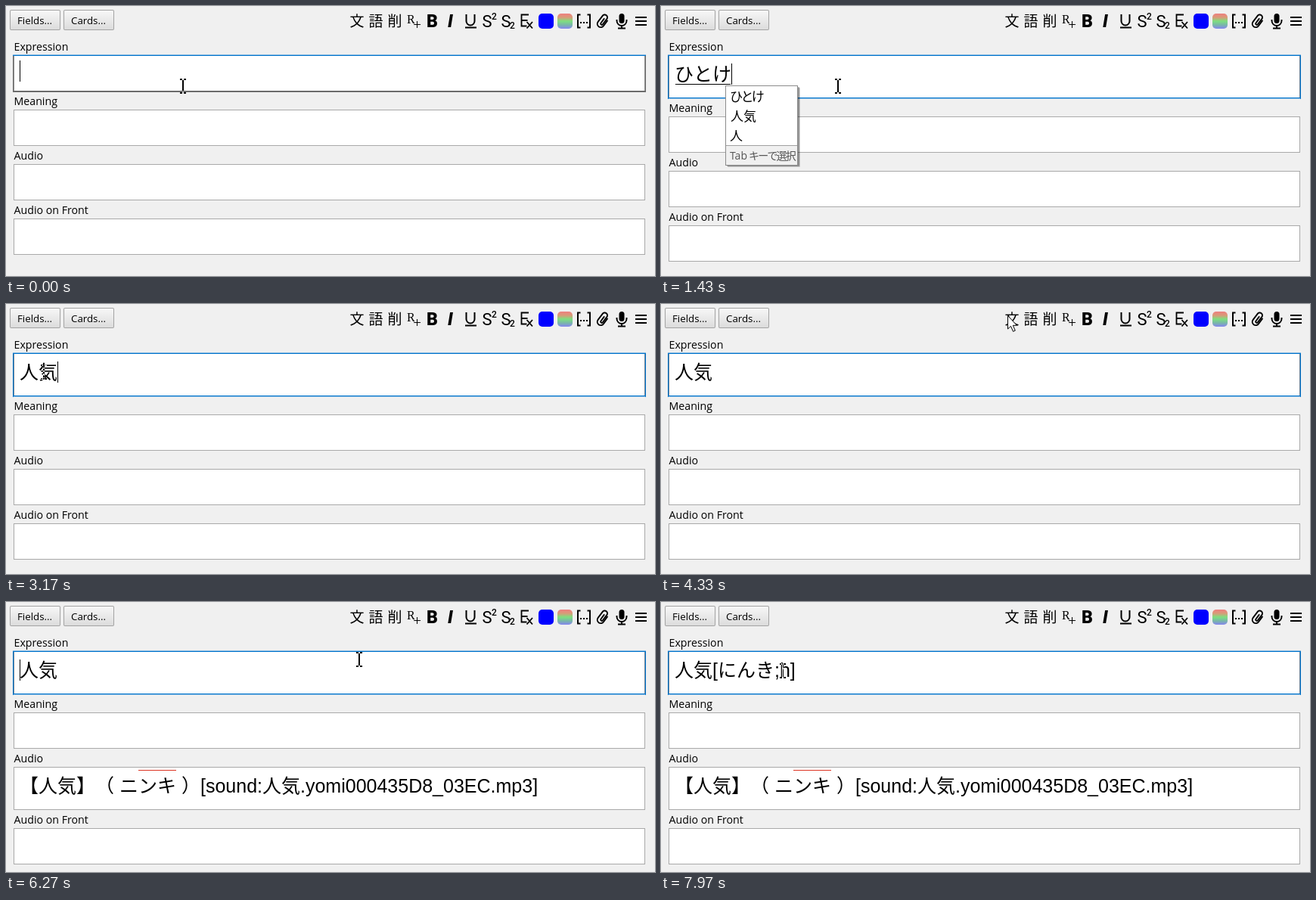
These frames come from a looping animation (858x357 px, 8 s). An HTML page with a canvas:

```html
<!DOCTYPE html>
<html lang="ja">
<head>
<meta charset="utf-8">
<style>
  html, body { margin: 0; width: 858px; height: 357px; overflow: hidden; background: #f0f0f0; }
  canvas { display: block; }
</style>
</head>
<body>
<canvas id="stage" width="858" height="357"></canvas>
<script>
const LOOP = 8000;
const ctx = document.getElementById('stage').getContext('2d');
const CJK = '"Noto Sans CJK JP", "Noto Sans CJK", sans-serif';
const UI = '"Open Sans", "Noto Sans", ' + CJK;
const FIELD = '300 25px "Liberation Sans", ' + CJK;
const BLUE = '#0074cc';

// Field content by start time; preedit entries are underlined
const typed = [
  [0, ''], [870, 'ｈ', 1], [930, 'ひ', 1], [1070, 'ひｔ', 1], [1170, 'ひと', 1],
  [1330, 'ひとｋ', 1], [1430, 'ひとけ', 1], [1630, '人気', 2], [1870, '人気'],
  [7400, '人気[にんき;h]']
];

// Caret: from, to, x
const carets = [
  [0, 30, 18], [530, 870, 18], [870, 1070, 43], [1070, 1330, 68], [1330, 1630, 93],
  [1870, 2400, 68], [2930, 3470, 68], [3530, 4060, 18], [4590, 5600, 18],
  [6110, 6640, 18], [7170, 7400, 18], [7400, 7930, 178]
];

const hold = () => 0;
const linear = p => p;
const easeOut = p => 1 - (1 - p) ** 2;
const easeInOut = p => p * p * (3 - 2 * p);

// Pointer: time, x, y, easing towards the next entry
const pointer = [
  [0, 234, 106, hold], [2430, 181, 91, hold], [2700, 181, 91, easeOut],
  [3470, 27, 90, hold], [3670, 27, 90, easeInOut], [4330, 458, 15, easeOut],
  [4470, 480, 15, easeOut], [4700, 490, 17, hold], [6030, 490, 17, easeInOut],
  [6270, 467, 76, easeOut], [6430, 462, 86, easeInOut], [6830, 462, 26, hold],
  [6870, 465, 22, hold], [7670, 465, 22, easeInOut], [7970, 161, 91, hold],
  [LOOP, 161, 91, linear]
];

const lastBefore = (list, t) => list.findLast(e => e[0] <= t);

function rect(x, y, w, h, color) {
  ctx.fillStyle = color;
  ctx.fillRect(x, y, w, h);
}

function frame(x, y, w, h, color) {
  ctx.strokeStyle = color;
  ctx.lineWidth = 1;
  ctx.strokeRect(x + .5, y + .5, w - 1, h - 1);
}

function text(s, x, y, font, color = '#000', spacing = 0) {
  ctx.font = font;
  ctx.fillStyle = color;
  ctx.letterSpacing = spacing + 'px';
  ctx.fillText(s, x, y);
}

function gradient(y, h, ...colors) {
  const g = ctx.createLinearGradient(0, y, 0, y + h);
  colors.forEach((c, i) => g.addColorStop(i / (colors.length - 1), c));
  return g;
}

function rounded(x, y, w, h, r, fill) {
  ctx.beginPath();
  ctx.roundRect(x, y, w, h, r);
  ctx.fillStyle = fill;
  ctx.fill();
}

function stroke(path, width) {
  ctx.strokeStyle = '#000';
  ctx.lineWidth = width;
  ctx.stroke(new Path2D(path));
}

function button(x, label) {
  rounded(x, 5, 67, 27, 2, '#a3a3a3');
  rounded(x + 1, 6, 65, 25, 1, gradient(6, 25, '#f7f7f7', '#dcdcdc'));
  text(label, x + 10, 24, '13.3px ' + UI);
}

function toolbar() {
  button(5, 'Fields...');
  button(76, 'Cards...');
  [...'文語削'].forEach((c, i) => text(c, 454.5 + 25 * i, 27, '19px ' + CJK));
  text('R', 530, 23, '16px "Liberation Serif", serif');
  stroke('M539 24.5h9M543.5 20v9', 1);
  text('B', 556, 28, '900 23px Roboto, sans-serif');
  text('I', 584, 28, 'italic 900 23px Roboto, sans-serif');
  stroke('M608.5 11v9a5.5 5.5 0 0 0 11 0v-9M607 28.5h15', 2);
  const thin = '22px Roboto, sans-serif', small = '500 12px Roboto, sans-serif';
  text('S', 629.5, 28, thin);
  text('2', 642, 18, small);
  text('S', 654.5, 28, thin);
  text('2', 666, 30, small);
  stroke('M691 11.5h-9.5v15h7M681.5 19h8M688.5 21l7.5 8.5M696 21l-7.5 8.5', 1.8);
  rounded(704, 10, 20, 20, 5, '#00f');
  rounded(729, 10, 20, 20, 5, gradient(10, 20, '#ee7f7f', '#d99a78', '#7de07f', '#79b7a8', '#8585f0'));
  stroke('M759.5 11.5h-3.5v17h3.5M768.5 11.5h3.5v17h-3.5', 2);
  for (const x of [759, 763, 767]) rect(x, 21, 2, 2, '#000');

  ctx.save();
  ctx.translate(789, 20);
  ctx.rotate(.65);
  ctx.lineCap = 'round';
  stroke('M4.5 -4v8.5a4.5 4.5 0 0 1 -9 0v-10a3.5 3.5 0 0 1 7 0v9a1.4 1.4 0 0 1 -3 0v-7', 1.9);
  ctx.restore();

  rounded(810.5, 10, 7, 13, 3.5, '#000');
  stroke('M807.5 18v1.5a6.5 6.5 0 0 0 13 0v-1.5M814 26v4M809 29.5h10', 1.9);
  for (const y of [14, 19, 24]) rect(832, y, 15, 2, '#000');
}

function fields(t) {
  const grow = t >= 870 ? 9 : 0, grow2 = t >= 5130 ? 9 : 0;
  const rows = [
    ['Expression', 65, 48 + grow], ['Meaning', 137 + grow, 48],
    ['Audio', 209 + grow, 48 + grow2], ['Audio on Front', 281 + grow + grow2, 48]
  ];
  for (const [label, y, h] of rows) {
    text(label, 10.5, y - 6, '14.2px ' + UI);
    rect(10, y, 835, h, '#fff');
    frame(10, y, 835, h, '#a9a9a9');
  }
  const edge = grow ? BLUE : '#6b6b6b', h = rows[0][2];
  frame(10, 65, 835, h, grow ? '#6c8296' : '#8a8a8a');
  frame(9, 64, 837, h + 2, edge);
  rect(9, 64, 837, 1, '#8bbbe2');
  rect(9, 65, 837, 1, BLUE);
  rect(10, 64 + h, 835, 1, edge);
  if (grow) rect(10, 65 + h, 835, 1, '#8bbbe2');
}

function popup(x, third) {
  rounded(x + 3, 108, 96, 105, 1, 'rgba(0,0,0,.18)');
  rounded(x + 2, 107, 96, 105, 1, 'rgba(0,0,0,.28)');
  rect(x, 105, 96, 106, '#fff');
  rect(x, 184, 96, 26, '#f0f0f0');
  rect(x, 184, 96, 1, '#a0a0a0');
  frame(x, 105, 96, 106, '#8c8c8c');
  const item = '17px ' + CJK;
  text('ひとけ', x + 6, 126, item, '#000', -2.6);
  text('人気', x + 7, 152, item);
  text(third, x + 6, 178, item);
  text('Tab', x + 6, 203, '14px ' + UI, '#555');
  text('キーで選択', x + 31, 203, '14px ' + CJK, '#555', -1.8);
}

function content(t) {
  const [, s, mark] = lastBefore(typed, t);
  text(s, 18, 99, FIELD);
  if (mark) rect(19, 103, 25 * s.length - 2, mark > 1 ? 2 : 1, '#000');

  if (t >= 5130) {
    text('【人気】', 18, 252, FIELD);
    text('（ ニンキ ）', 118, 252, FIELD);
    text('[sound:人気.yomi000435D8_03EC.mp3]', 257, 252, FIELD);
    rect(175, 222, 50, 1, '#dd3322');
  }

  const caret = carets.find(([from, to]) => t >= from && t < to);
  if (caret) rect(caret[2], t < 870 ? 72 : 76, 1, 28, '#000');
  if (mark === 1) popup(10 + 25 * s.length, t < 930 ? 'は' : '人');
}

function iBeam(x, y) {
  ctx.globalCompositeOperation = 'difference';
  for (const dy of [-10, 8]) {
    rect(x - 4, y + dy, 3, 2, '#fff');
    rect(x + 1, y + dy, 3, 2, '#fff');
  }
  rect(x - 1, y - 8, 2, 16, '#fff');
  ctx.globalCompositeOperation = 'source-over';
}

function arrow(x, y) {
  ctx.save();
  ctx.translate(x + .5, y + .5);
  const shape = new Path2D('M0 0V17.5L4 13.8L7 20.8L9.8 19.6L6.8 12.8H12Z');
  ctx.fillStyle = '#fff';
  ctx.fill(shape);
  ctx.strokeStyle = '#000';
  ctx.lineWidth = 1;
  ctx.stroke(shape);
  ctx.restore();
}

function drawPointer(t) {
  const i = pointer.findLastIndex(e => e[0] <= t);
  const [t0, x0, y0, ease] = pointer[i];
  const [t1, x1, y1] = pointer[i + 1];
  const p = ease((t - t0) / (t1 - t0));
  const x = Math.round(x0 + (x1 - x0) * p), y = Math.round(y0 + (y1 - y0) * p);
  (y > 65 ? iBeam : arrow)(x, y);
}

const start = performance.now();

function draw() {
  const t = Math.max(0, performance.now() - start) % LOOP;
  rect(0, 0, 858, 357, '#f0f0f0');
  toolbar();
  fields(t);
  content(t);
  drawPointer(t);
  requestAnimationFrame(draw);
}
draw();
</script>
</body>
</html>
```
